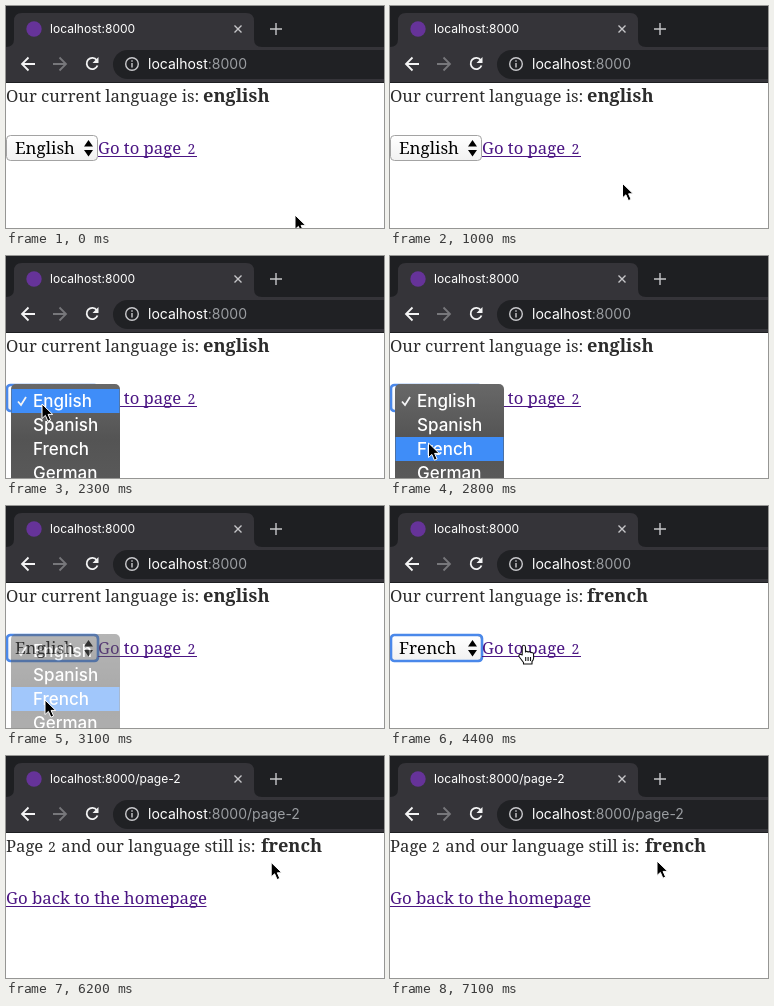
An HTML page for the animation above (7200 ms loop, 378 by 222 pixels).

```html
<!DOCTYPE html>
<html lang="en">
<head>
<meta charset="utf-8">
<title>Language picker</title>
<style>
  html, body { margin: 0; width: 100%; height: 100%; overflow: hidden; background: #fff; }
  svg { display: block; width: 378px; height: 222px; }
  text { white-space: pre; }
  .ui { font-family: Inter, "Open Sans", sans-serif; fill: #fff; }
  .serif { font: 16.65px "Noto Serif", serif; fill: #2c2c2c; }
  .bold { font-weight: 700; font-size: 18.2px; }
  .low { font-size: 14px; }
  .link { fill: #4b1583; }
  .line { stroke: #4b1583; stroke-width: 1; }
  .icon { fill: none; stroke: #f4f4f5; stroke-width: 1.8; }
  .black { fill: #000; }
</style>
</head>
<body>
<svg viewBox="0 0 378 222" xmlns="http://www.w3.org/2000/svg">
  <defs>
    <linearGradient id="face" x2="0" y2="1">
      <stop offset="0" stop-color="#fff"/><stop offset="1" stop-color="#f1f1f1"/>
    </linearGradient>
    <linearGradient id="panel" x2="0" y2="1">
      <stop offset="0" stop-color="#686868"/><stop offset=".5" stop-color="#545454"/><stop offset="1" stop-color="#5b5b5b"/>
    </linearGradient>
  </defs>

  <!-- browser bar -->
  <rect width="378" height="77" fill="#1e1f22"/>
  <path d="M0 41Q8 41 8 33V15Q8 7 16 7H240Q248 7 248 15V33Q248 41 256 41H378V76H0Z" fill="#353439"/>
  <rect x="107" y="44" width="290" height="29" rx="14.5" fill="#202124"/>
  <circle cx="28" cy="23" r="7.7" fill="#663399"/>
  <text id="tab" class="ui" x="44" y="27.3" font-size="12.05"></text>
  <path class="icon" style="stroke:#c6c6c9;stroke-width:1.4" d="M228.5 19.5l7 7m0-7l-7 7M264 23h12m-6-6v12"/>
  <path class="icon" d="M29 58H16.5M22.5 51.5L16 58l6.5 6.5"/>
  <path id="forward" class="icon" d="M47 58h12.5M53.5 51.5L60 58l-6.5 6.5"/>
  <path class="icon" d="M90.8 54.2A5.6 5.6 0 1 0 91.5 59.5"/>
  <path d="M92.5 51v6h-6z" fill="#f4f4f5"/>
  <g class="icon" style="stroke:#c9c9cc;stroke-width:1.4">
    <circle cx="126" cy="58" r="6.3"/><path d="M126 57v4.5M126 54.2v1.5"/>
  </g>
  <text class="ui" x="142" y="63" font-size="14">localhost<tspan id="path" fill="#9a9da1"></tspan></text>

  <g id="home">
    <text class="serif" y="96">Our current language is: </text>
    <text id="lang" class="serif bold" x="197" y="96"></text>
    <rect x=".5" y="129.5" width="91" height="25" rx="4" fill="url(#face)" stroke="#a3a3a3"/>
    <rect id="ring" x="1" y="129" width="91" height="26" rx="3.5" fill="none" stroke="#4a88ea" stroke-width="2.6"/>
    <text id="choice" class="serif black" x="9" y="148" style="font-size:17px"></text>
    <path d="M78 140.5l4.5-6.5 4.5 6.5zM78 144l4.5 6.5 4.5-6.5z"/>
    <text class="serif link" x="92" y="148">Go to page <tspan class="low" x="181.5">2</tspan></text>
    <path class="line" d="M92 150.5H191"/>
  </g>

  <g id="second">
    <text class="serif" y="96">Page <tspan class="low" dx=".5">2</tspan><tspan dx="1"> and our language still is: </tspan></text>
    <text class="serif bold" x="255" y="96">french</text>
    <text class="serif link" y="148" style="font-size:16.8px">Go back to the homepage</text>
    <path class="line" d="M0 150.5H200.5"/>
  </g>

  <g id="menu">
    <rect x="5" y="128" width="109" height="110" rx="5" fill="url(#panel)"/>
    <rect id="hover" x="5.5" width="108" height="24" fill="#3f8df8"/>
    <path class="icon" d="M12 145.5l3 3.5 5-8"/>
    <g id="items" class="ui" font-size="17" font-weight="500"></g>
  </g>

  <g id="pointer" stroke="#fff" stroke-linejoin="round">
    <path id="arrow" d="M0 0V14.5L3.4 11.4 5.9 17.2 8.6 16 6.1 10.4H10.7Z"/>
    <path id="hand" fill="#fff" stroke="#111" stroke-width="1.1"
      d="M-1.8 9V1.2Q-1.8-.8-.2-.8T1.5 1.2V6Q2.2 4.7 4.3 6Q5.3 5 7 6.7Q9.6 6 9.6 9V12Q9.6 14 8 15.5V18H-.5V16.5L-5 10.5Q-5.6 8.3-3.4 8.3ZM1.7 11v4M4.1 11v4M6.5 11v4"/>
  </g>
</svg>
<script>
const LOOP = 7200, STEP = 100;
const el = id => document.getElementById(id);
const show = (id, on) => { el(id).style.display = on ? '' : 'none'; };
const write = (id, s) => { if (el(id).textContent !== s) el(id).textContent = s; };

// pointer stops: time, x, y
const stops = [
  [0, 289, 209], [200, 289, 209], [850, 262, 179], [1500, 44, 167], [1800, 37, 140],
  [2100, 37, 140], [2300, 36, 148], [2500, 36, 149], [2900, 39, 194], [3300, 39, 194],
  [4000, 111, 164], [4350, 134, 140], [4750, 134, 140], [5200, 226, 137],
  [5500, 226, 137], [6300, 267, 105], [LOOP, 267, 105]
];
const OPEN = 2100, PICK = 3000, COMMIT = 3200, VISIT = 4700;

el('forward').style.stroke = '#77777b';

['English', 'Spanish', 'French', 'German'].forEach((name, i) => {
  const t = document.createElementNS('http://www.w3.org/2000/svg', 'text');
  t.setAttribute('x', 27);
  t.setAttribute('y', 151 + 24 * i);
  t.textContent = name;
  el('items').append(t);
});

function pointerAt(t) {
  const i = stops.findIndex(s => s[0] > t);
  const [t0, x0, y0] = stops[i - 1], [t1, x1, y1] = stops[i];
  const p = (t - t0) / (t1 - t0), e = p * p * (3 - 2 * p);
  return [x0 + (x1 - x0) * e, y0 + (y1 - y0) * e];
}

function draw(t) {
  const [x, y] = pointerAt(t);
  const away = t >= VISIT, french = t >= COMMIT;
  const menuAlpha = t < OPEN ? 0 : Math.max(0, Math.min(1, 1 - (t - PICK) / 195));

  show('home', !away);
  show('second', away);
  write('tab', 'localhost:8000' + (away ? '/page-2' : ''));
  write('path', ':8000' + (away ? '/page-2' : ''));
  write('lang', french ? 'french' : 'english');
  write('choice', french ? 'French' : 'English');
  show('ring', t >= OPEN);

  show('menu', menuAlpha > 0);
  el('menu').style.opacity = menuAlpha;
  const row = Math.max(0, Math.min(3, Math.floor((y - 133) / 24)));
  el('hover').setAttribute('y', 133 + 24 * row);

  const onLink = y > 131 && y < 154 && (away ? x < 201 : x > 92 && x < 191);
  show('hand', onLink);
  show('arrow', !onLink);
  el('pointer').setAttribute('transform', `translate(${x.toFixed(1)} ${y.toFixed(1)})`);
}

const start = performance.now();
function tick() {
  const t = (performance.now() - start) % LOOP;
  draw(Math.floor(t / STEP) * STEP);
  requestAnimationFrame(tick);
}
tick();
</script>
</body>
</html>
```
